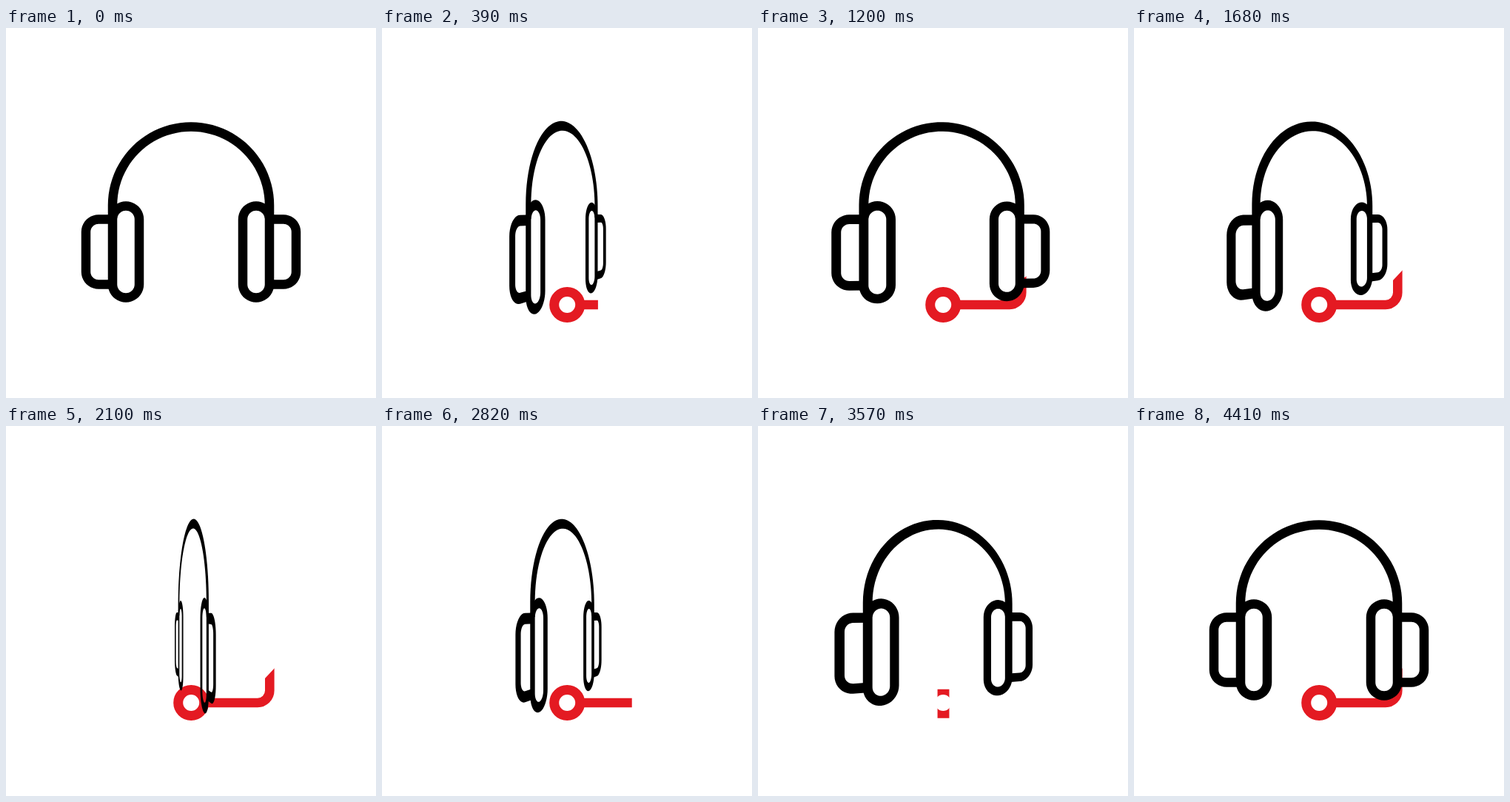
An HTML page that plays this animation: 500x500 px, repeating every 4440 ms.

```html
<!DOCTYPE html>
<html lang="en">
<head>
<meta charset="utf-8">
<title>Headset</title>
<style>
  html, body { margin: 0; width: 100%; height: 100%; overflow: hidden; background: #fff; }
  svg { display: block; width: 100vw; height: 100vh; }
</style>
</head>
<body>
<svg viewBox="0 0 500 500">
  <clipPath id="wipe"><polygon id="mask"/></clipPath>
  <g clip-path="url(#wipe)" fill="none" stroke="#e41a22">
    <circle cx="250.2" cy="374" r="17.5" stroke-width="13"/>
    <path d="M271 374H340A16.5 16.5 0 0 0 356.3 357.5V320" stroke-width="12.6"/>
  </g>
  <g id="set"></g>
</svg>
<script>
const LOOP = 4440, STEP = 30;
const SPIN = 3660, TURNS = 3;
const DEPTH = 694.4, MID = 250;
const HALF = 6.25;
const set = document.getElementById('set');
const mask = document.getElementById('mask');

function arc(cx, cy, r, from, to, n = 10) {
  return Array.from({ length: n + 1 }, (_, i) => {
    const a = (from + (to - from) * i / n) * Math.PI / 180;
    return [cx + r * Math.cos(a), cy + r * Math.sin(a)];
  });
}

// Closed outline of a stroke, from its outer and inner edges.
const band = edge => [...edge(HALF), ...edge(-HALF).reverse()];
const mirror = pts => pts.map(([x, y]) => [2 * MID - x, y]);

const arch = band(o => [
  [144 - o, 257], ...arc(MID, 239.5, 106 + o, 180, 360, 48), [356 + o, 257]
]);
const pad = band(o => [
  [144, 346.5 + o], ...arc(125, 329.5, 17 + o, 90, 180),
  ...arc(125, 275.5, 17 + o, 180, 270), [144, 258.5 - o]
]);
const cup = band(o => {
  const pts = [...arc(162, 258.5, 18 + o, 180, 360, 20), ...arc(162, 346.5, 18 + o, 0, 180, 20)];
  return [...pts, pts[0]];
});

const parts = [arch, pad, cup, mirror(pad), mirror(cup)].map(pts => {
  const path = document.createElementNS('http://www.w3.org/2000/svg', 'path');
  set.append(path);
  return { pts, path };
});

function project(pts, angle) {
  const c = Math.cos(angle), s = Math.sin(angle);
  return 'M' + pts.map(([x, y]) => {
    const dx = x - MID, k = DEPTH / (DEPTH - dx * s);
    return (MID + dx * c * k).toFixed(2) + ' ' + (MID + (y - MID) * k).toFixed(2);
  }).join('L') + 'Z';
}

const clamp = v => Math.max(0, Math.min(1, v));

function reveal(t) {
  if (t < 2340) return clamp(t / 1300);
  if (t < SPIN) return clamp((3645 - t) / 1305);
  return clamp((t - SPIN) / 750);
}

function wipe(p) {
  const reach = p * 138, cx = 250.5;
  const right = cx + Math.min(reach, 114);
  const left = cx - Math.min(reach, 26);
  const top = 374 - Math.min(26, 14.5 + reach * 0.47);
  const bottom = Math.min(400, 391.5 + reach * 0.4);
  const rise = clamp((reach - 114) / 24);
  return [
    [left, top], [340, top], [350, 346 - 5 * rise],
    [364, 346 - 20 * rise], [364, bottom], [left, bottom]
  ].map(([x, y]) => Math.min(x, right) + ',' + y).join(' ');
}

function draw(now) {
  const t = Math.floor((now % LOOP) / STEP) * STEP;
  const angle = clamp(t / SPIN) * TURNS * 2 * Math.PI;
  for (const { pts, path } of parts) path.setAttribute('d', project(pts, angle));
  mask.setAttribute('points', wipe(reveal(t)));
}

let start;
function tick(now) {
  start ??= now;
  draw(Math.max(0, now - start));
  requestAnimationFrame(tick);
}
draw(0);
requestAnimationFrame(tick);
</script>
</body>
</html>
```
